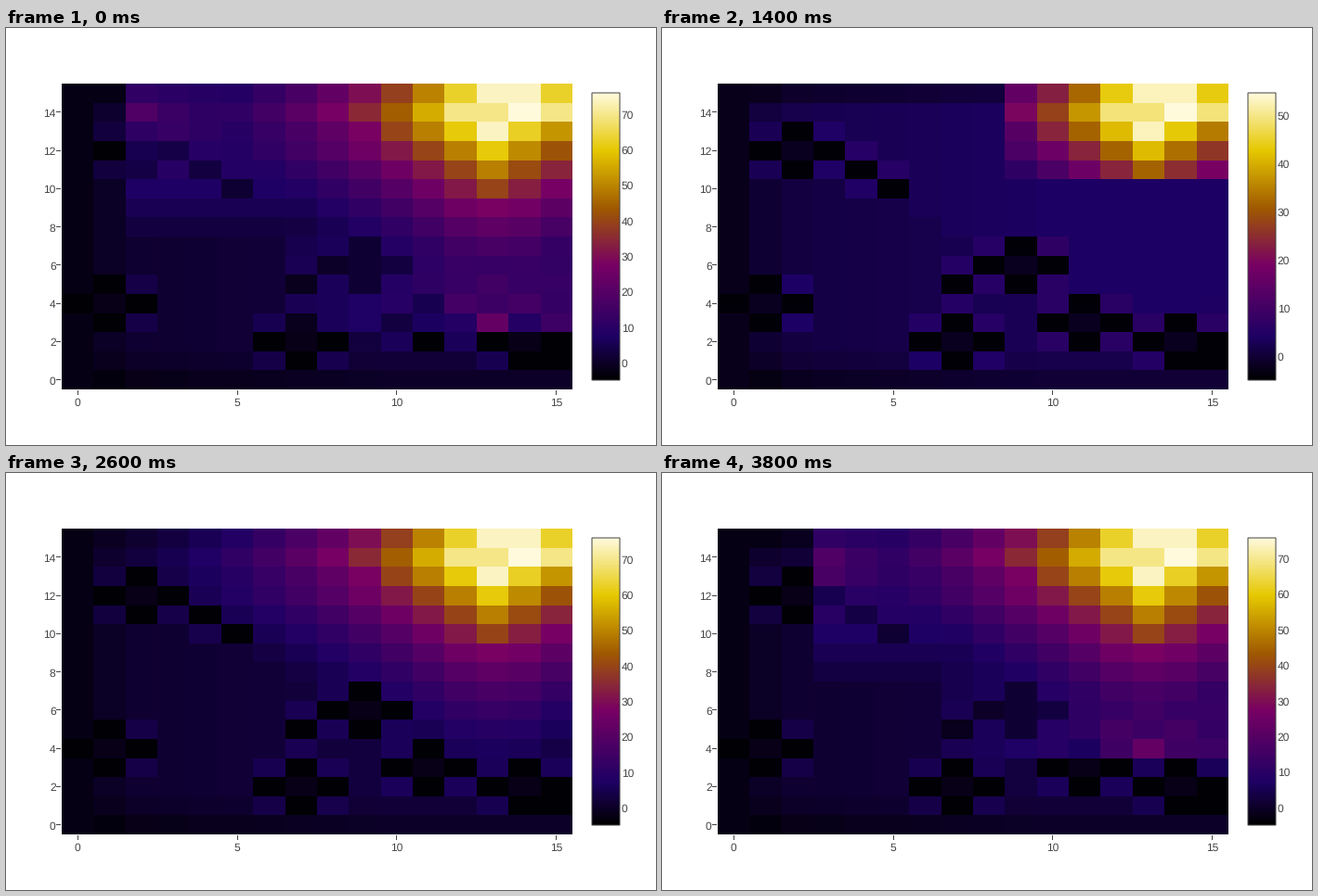
Recreate the animation shown at these times as a matplotlib script. Size 700 px wide and 450 px high, loop 4000 ms.

```python
import numpy as np
import matplotlib.pyplot as plt
from matplotlib.animation import FuncAnimation
from matplotlib.colors import LinearSegmentedColormap
from matplotlib.patches import Rectangle

W, H, DPI = 700, 450, 100
N = 16
FRAMES, INTERVAL = 20, 200
SETTLED = 7                                # age at which a wave has died out
TOP, LOW_END = 76, -4.9
INK = "#444444"
X0, X1, Y0, Y1 = 60, 610, 390, 60          # heatmap box
BX0, BX1, BY0, BY1 = 631, 661, 380, 70     # colour bar box
CW, CH = (X1 - X0) / N, (Y0 - Y1) / N

plt.rcParams["font.family"] = "Liberation Sans"
plt.rcParams["text.hinting"] = "none"

STOPS = [(0, (0, 0, 0)), (.15, (30, 0, 100)), (.4, (120, 0, 100)),
         (.6, (160, 90, 0)), (.8, (230, 200, 0)), (1, (255, 250, 220))]
CMAP = LinearSegmentedColormap.from_list(
    "heat", [(t, tuple(c / 255 for c in rgb)) for t, rgb in STOPS], N=1024)

# Pits lie in rings of four around these cells, plus a few single ones
RINGS = [(2, 12), (9, 6), (1, 4), (11, 3), (7, 2), (14, 2)]
SINGLES = [(4, 11), (5, 10), (7, 5), (15, 1)]

y, x = np.mgrid[:N, :N]


def make_pits():
    pits = np.zeros((N, N), bool)
    for cx, cy in RINGS:
        pits |= np.abs(x - cx) + np.abs(y - cy) == 1
    for cx, cy in SINGLES:
        pits[cy, cx] = True
    return pits


def make_low(pits):
    """Faint background: rises to the right, brighter between pits."""
    p = np.pad(pits.astype(int), 1)
    near = p[:-2, 1:-1] + p[2:, 1:-1] + p[1:-1, :-2] + p[1:-1, 2:]
    z = np.minimum(.5 + .25 * x, 3) + 3 * ((near == 2) | (near == 3))
    z -= 3 * ((y == 0) | (y == N - 1)) + (y == 1) + (x == 1)
    return np.where(x == 0, -2.5, z)


def make_full(low):
    """Settled values: decay with the number of steps from the goal."""
    d = np.where(x > 13, .85 * (x - 13), 13 - x) + np.abs(13 - y)
    d = d + .6 * (((x == 13) | (y == 13)) & (d > 3))
    side = np.abs(x - 13.5)
    d = np.where(y == 14, .3 + 1.1 * np.maximum(side - 1.5, 0), d)
    d = np.where(y == 15, 1.15 * np.maximum(side - .8, 0), d)
    z = 82 * .835 ** d - 8
    z[14, 14] = TOP
    return np.where((x == 0) | (y < 3), low, np.maximum(z, low))


PITS = make_pits()
LOW = make_low(PITS)
FULL = make_full(LOW)
HOLES = PITS.copy()
for cx, cy in RINGS:
    HOLES[cy, cx] = True
DEPTH = np.where(PITS, -4.2, -2)


def age_of(i):
    k = (i - 6) % FRAMES
    return min(k if k < 8 else k - 8, SETTLED)


def peak_of(age):
    return TOP if age == SETTLED else TOP - 44 * np.exp(-.72 * age ** 1.25)


def left_crest(front):
    k = np.maximum(x - front, 0)
    floor = np.clip(2.1 * (y - 6.5), 0, 10 - .5 * k)
    return floor + 10 * np.exp(-k / 1.5 - (y - 13.6) ** 2)


def low_crest(front):
    j = np.maximum(y - front, 0)
    swing = np.where((x + j) % 2, 11, 4)
    crest = 6 + 1.5 * np.minimum(x - 8, 4) \
        + swing * np.exp(-j / 1.6 - ((x - 13) / 1.6) ** 2)
    return np.where((x >= 7) & (j < 5), crest, 0)


def field(i):
    age = age_of(i)
    if age == SETTLED:
        return np.where(HOLES, DEPTH, FULL)

    left, bottom = max(8 - age, 11 - 2 * age), max(9 - age, 14 - 3 * age)
    peak = peak_of(age)
    gain = 1 - .007 * (TOP - peak)
    hot = peak - gain * (TOP - FULL)
    if age > 1:
        hot = np.maximum(hot, np.maximum(left_crest(left), low_crest(bottom)))

    passed = (x >= left) & (y >= bottom)
    z = np.where(passed, np.maximum(hot, LOW), np.minimum(FULL, LOW + 1))
    sunk = np.where(passed, np.maximum(z - 6, DEPTH), DEPTH)
    return np.where(HOLES, sunk, z)


fig = plt.figure(figsize=(W / DPI, H / DPI), dpi=DPI, facecolor="white")
ax = fig.add_axes([0, 0, 1, 1])
ax.axis("off")


def label(px, py, s, ha):
    return ax.text(px, py, s, ha=ha, va="baseline", color=INK, fontsize=12 * 72 / DPI)


def tick(px, py, w, h):
    ax.add_patch(Rectangle((px, py), w, h, fc=INK, ec="none", antialiased=False))


def image(data, x0, x1, y0, y1):
    return ax.imshow(data, cmap=CMAP, origin="lower", aspect="auto",
                     interpolation="nearest", extent=(x0, x1, y0, y1))


# The small shift rounds half-pixel cell edges to the right
heat = image(field(0), X0 + .05, X1 + .05, Y0, Y1)
image(np.linspace(0, 1, BY0 - BY1)[:, None], BX0, BX1, BY0, BY1)
ax.add_patch(Rectangle((BX0, BY1), BX1 - BX0, BY0 - BY1, fill=False,
                       ec=INK, lw=72 / DPI, snap=False))

for v in range(0, N, 5):
    px = X0 + (v + .5) * CW
    tick(round(px - .5), 391, 1, 5)
    label(px, 408, str(v), "center")
for v in range(0, N, 2):
    py = Y0 - (v + .5) * CH
    tick(54, round(py - .5), 5, 1)
    label(53.6, py + 4.8, str(v), "right")

bar_labels = [label(662.8, 0, "", "left") for _ in range(10)]
ax.set_xlim(0, W)
ax.set_ylim(H, 0)


def update(i):
    lo, hi = LOW_END, peak_of(age_of(i))
    heat.set_data(field(i))
    heat.set_clim(lo, hi)
    step = 10 if hi - lo > 45 else 5
    for k, t in enumerate(bar_labels):
        v = k * step
        t.set_visible(bool(v <= hi))
        t.set_text(str(v))
        t.set_y(BY0 - (v - lo) / (hi - lo) * (BY0 - BY1) + 4.6)
    return [heat, *bar_labels]


anim = FuncAnimation(fig, update, frames=FRAMES, interval=INTERVAL,
                     repeat=True, repeat_delay=0, blit=False)
plt.show()
```
